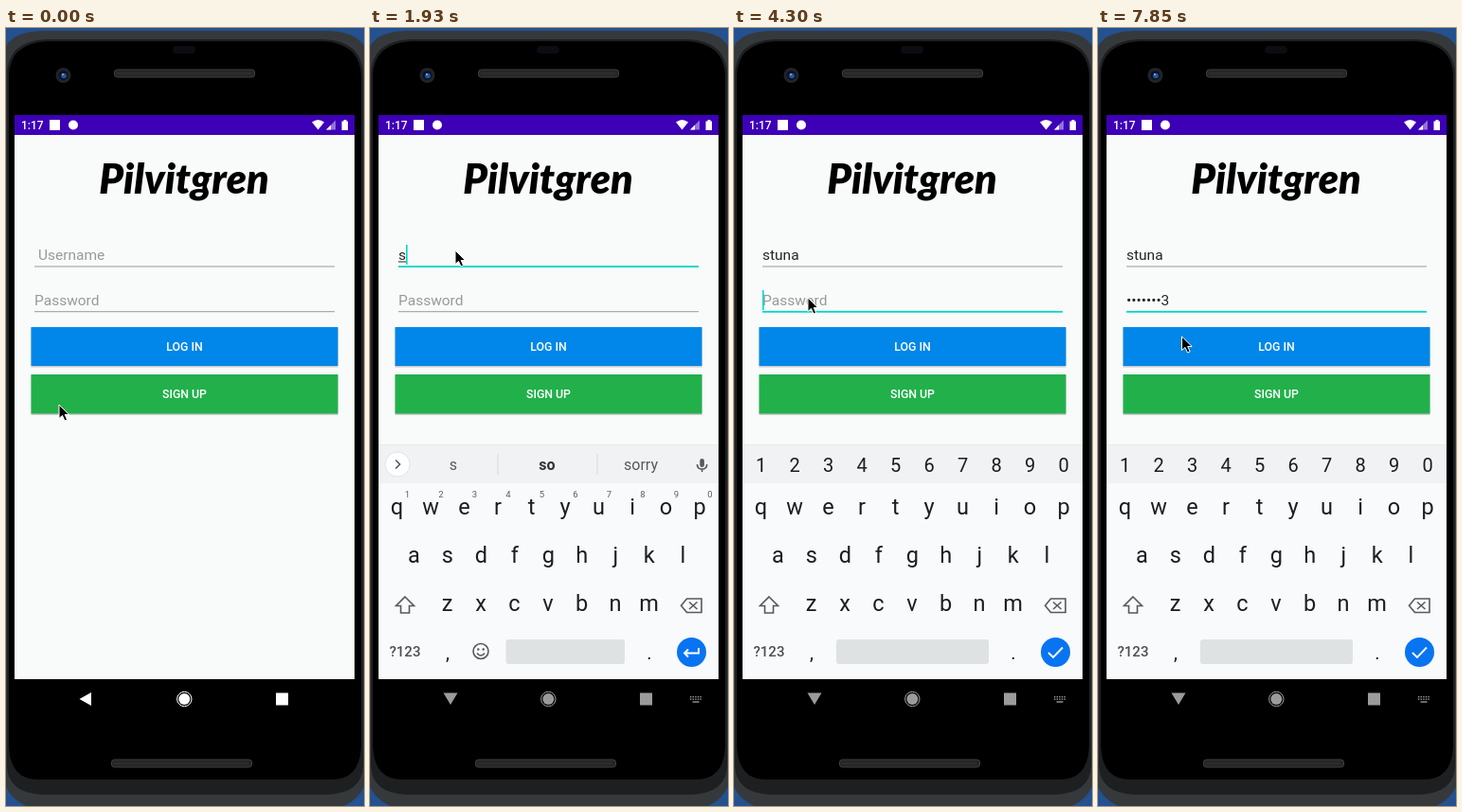
Write an HTML page that moves like this. It is 378 px wide and 822 px high and loops after 8 s.

```html
<!DOCTYPE html>
<html lang="en">
<head>
<meta charset="utf-8">
<title>Login screen</title>
<style>
html, body { margin: 0; width: 100%; height: 100%; overflow: hidden; background: #000; }
svg { display: block; width: 100%; height: 100%; font-family: Roboto, sans-serif; }
.mid { text-anchor: middle; }
.key { font-size: 23.5px; fill: #1c1d1f; }
.num { font-size: 20px; fill: #1c1d1f; }
.tip { font-size: 9.5px; fill: #5c6064; }
.sug { font-size: 16px; fill: #56595d; }
.btn { font-size: 12.3px; font-weight: 500; fill: #fff; }
.field { font-size: 15.5px; fill: #262626; white-space: pre; }
.hint { font-size: 15.5px; fill: #999; }
.line { fill: none; stroke: #56595d; stroke-width: 1.6; }
</style>
</head>
<body>
<svg id="stage" viewBox="0 0 378 822" preserveAspectRatio="none"></svg>
<script>
const LOOP = 8000, STEP = 148.3;
const stage = document.getElementById('stage');

const text = (x, y, s, cls, more = '') => `<text x="${x}" y="${y}" class="${cls}" ${more}>${s}</text>`;
const rect = (x, y, w, h, fill, more = '') =>
  `<rect x="${x}" y="${y}" width="${w}" height="${h}" fill="${fill}" ${more}/>`;
const circle = (x, y, r, fill, more = '') => `<circle cx="${x}" cy="${y}" r="${r}" fill="${fill}" ${more}/>`;
const path = (d, fill, more = '') => `<path d="${d}" fill="${fill}" ${more}/>`;
const line = d => `<path d="${d}" class="line"/>`;
const group = (id, body) => `<g id="${id}">${body}</g>`;
const row = (chars, x, y, cls) =>
  [...chars].map((c, i) => text(x + 35.5 * i, y, c, cls + ' mid')).join('');

function phone() {
  return rect(0, 0, 378, 822, '#24518f') +
    path('M-2 24Q4 4 38 3H340Q374 4 380 24V796Q374 818 346 826H32Q4 818 -2 796Z', '#36393b') +
    path('M1 50Q1 14 42 12H336Q377 14 377 50V780Q376 808 340 810H38Q2 808 1 780Z', '#1d1f20') +
    path('M3 52Q3 16 44 14H334Q375 16 375 52V758Q374 794 344 794H34Q4 794 3 758Z', '#000') +
    rect(176, 19, 24, 8, '#0c0c12', 'rx="4"') +
    circle(60.5, 50, 8, '#20242a') + circle(60.5, 50, 5, '#0b1426') + circle(61, 50.5, 2.8, '#28569f') +
    circle(60, 49, 1, '#8fb4e0') +
    [[114.5, 44], [111.5, 773]].map(([x, y]) =>
      rect(x, y, 148, 8, '#242424', 'rx="3" stroke="#414141"') +
      `<path d="M${x + 3} ${y + 4}h142" stroke="#343434" stroke-width="3" stroke-dasharray="1 1"/>`).join('');
}

function statusBar() {
  return rect(9, 92, 359, 21, '#3d00b7') +
    text(16, 107, '1:17', 'btn', 'style="font-size:12px"') +
    rect(46, 97, 11, 11, '#fff') + circle(71, 102.5, 5, '#fff') +
    path('M323 99.5Q329.500 94.500 336 99.5L329.5 107.5Z', '#fff') +
    path('M338 107.5L348 97.500V107.5Z', '#fff', 'opacity=".45"') + path('M338 107.5L343 102.5V107.5Z', '#fff') +
    path('M354.500 98.500H356.500V97H359.500V98.500H361V108H354.500Z', '#fff');
}

function form() {
  const button = (y, h, fill, label) =>
    rect(26.5, y + 1, 324, h + .5, '#aaa', 'opacity=".6"') + rect(26.5, y, 324, h, fill) +
    text(188.5, y + 25.3, label, 'btn mid');
  return text(188, 175, 'Pilvitgren', 'mid',
      'font-family="Lato, sans-serif" font-size="43" font-weight="900" font-style="italic"') +
    group('userLine', '') + group('passLine', '') +
    text(34, 245, 'Username', 'hint', 'id="userHint"') + text(30, 293, 'Password', 'hint', 'id="passHint"') +
    text(30, 245, '', 'field', 'id="user"') + text(30, 293, '', 'field', 'id="pass"') +
    rect(30, 246.5, 0, 1, '#262626', 'id="compose"') +
    button(316, 41, '#0087e9', 'LOG IN') + button(366, 41.5, '#22b04b', 'SIGN UP');
}

const mic = rect(348.3, 455, 4.6, 9, '#56595d', 'rx="2.3"') + line('M345.500 461Q345.500 466 350.600 466T355.700 461M350.600 466V469');

function toolbar() {
  return circle(29, 462, 13, '#fff', 'stroke="#e2e4e6"') + line('M31 457.500L26.500 462L31 466.500') +
    `<circle cx="76" cy="460.500" r="4.700" class="line"/>` + line('M79.500 464L84.500 469') +
    line('M124 456.500H136V464L132 468.500H124ZM132 468V464H136M127 463Q129.500 466 132 463') +
    circle(127.5, 460, 1, '#56595d') + circle(132.5, 460, 1, '#56595d') +
    text(181, 466.5, 'GIF', 'mid', 'font-size="12.5" font-weight="700" fill="#56595d"') +
    rect(229, 455.5, 13, 13, '#6a6d71') + rect(266.5, 452, 1, 21, '#d5d8da') +
    [294, 299.5, 305].map(x => circle(x, 462, 1.7, '#56595d')).join('') + mic;
}

function suggestions() {
  return circle(29, 461, 13, '#fff', 'stroke="#e2e4e6"') + line('M27 456.500L31.500 461L27 465.500') +
    text(88, 467, '', 'sug mid', 'id="sug0"') +
    text(187, 467, '', 'sug mid', 'id="sug1" style="font-weight:700;fill:#333"') +
    text(286, 467, '', 'sug mid', 'id="sug2"') +
    rect(134.5, 450, 1, 22, '#d5d8da') + rect(239.5, 450, 1, 22, '#d5d8da') + mic;
}

function keyboard() {
  const face = `<circle cx="117" cy="658.500" r="8" class="line"/>` + circle(114.3, 656.5, 1.2, '#56595d') +
    circle(119.7, 656.5, 1.2, '#56595d') + line('M113 660.500Q117 665.500 121 660.500');
  const enter = 'fill="none" stroke="#fff" stroke-width="1.900"';
  return rect(9, 440, 359, 248, '#f8fafb') + rect(9, 440, 359, 41, '#f0f2f4') +
    rect(9, 440, 359, 1, '#e7e9eb') +
    group('tools', toolbar()) + group('sugs', suggestions()) +
    group('digits', row('1234567890', 28.5, 469, 'num')) +
    group('tips', row('1234567890', 39.5, 496, 'tip')) +
    row('qwertyuiop', 28.5, 514, 'key') + row('asdfghjkl', 46.3, 565, 'key') + row('zxcvbnm', 81.5, 616, 'key') +
    line('M37 601L46.500 610.500H41.500V618H32.500V610.500H27.500Z') +
    line('M334.500 603H350V617.500H334.500L328.500 610.200ZM337 606.500L345.500 614M345.500 606.500L337 614') +
    text(37, 664, '?123', 'mid', 'font-size="15" font-weight="500" fill="#4c4f53"') +
    text(82, 667, ',', 'num mid') + text(295, 667, '.', 'num mid') +
    group('emoji', face) + rect(143.5, 646, 125.5, 26, '#dfe2e2', 'rx="3" id="space"') +
    circle(339.5, 659.5, 15.5, '#0874f2') +
    group('enter', path('M347 655V660.500H332M336 656.500L332 660.500L336 664.500', 'none', enter)) +
    group('done', path('M332 660L337 665L347 654.500', 'none', enter));
}

function navBar() {
  const home = fill => circle(188.3, 709, 6, fill) + `<circle cx="188.300" cy="709" r="7.700" fill="none" stroke="${fill}"/>`;
  const dots = [0, 1].map(r => [0, 1, 2, 3, 4].map(c =>
    rect(338 + c * 2.6, 706 + r * 2.5, 1.4, 1.4, '#999')).join('')).join('');
  return group('navIdle', path('M77.500 709L90 702V716Z', '#fff') + home('#fff') + rect(285, 702.5, 13, 13, '#fff')) +
    group('navTyping', path('M77.500 702.500H92.500L85 715Z', '#9b9b9b') + home('#9b9b9b') +
      rect(285, 702.5, 13, 13, '#9b9b9b') + dots + rect(340.5, 711.3, 7, 1.4, '#999'));
}

stage.innerHTML = phone() + rect(9, 92, 359, 596, '#f9fafa') + statusBar() + form() + navBar() +
  '<clipPath id="clip"><rect x="9" y="113" width="359" height="577"/></clipPath>' +
  `<g clip-path="url(#clip)">${group('keys', keyboard())}</g>` +
  rect(30, 229, 1.6, 21, '#03d6c6', 'id="caret"') +
  path('M0 0V14.500L3.500 11.500L6 17L8.600 15.900L6.200 10.500H10.700Z', '#000',
    'id="mouse" stroke="#fff" stroke-width="1"');

const el = {};
stage.querySelectorAll('[id]').forEach(n => el[n.id] = n);
const show = (id, on) => el[id].setAttribute('display', on ? 'inline' : 'none');
const put = (id, s) => { if (el[id].textContent !== s) el[id].textContent = s; };

const NAME = 'stuna', SECRET = NAME + '123';
const nameAt = [1925, 2075, 2375, 2825, 2965];
const secretAt = [5185, 5325, 5625, 6075, 6225, 6665, 6815, 7255];
const FOCUS = 1030, SWITCH = 4150, KEYPAD = 4295;
const words = [['s', 'so', 'sorry'], ['st', 'still', 'stuff'], ['stu', 'stuff', 'study'],
  ['stun', 'stunt', 'stung'], ['stuna', 'Stuna', 'Stulm']];
const moves = [
  [140, 890, 56, 398, 90, 235],
  [3600, 4010, 90, 235, 78, 285],
  [7300, 7850, 78, 285, 88.5, 326]
];
const count = (times, t) => times.filter(at => at <= t).length;

function mouseAt(t) {
  let pos = [56, 398];
  for (const [from, to, x0, y0, x1, y1] of moves) {
    if (t < from) break;
    const p = Math.min(1, (t - from) / (to - from)), e = p * p * (3 - 2 * p);
    pos = [x0 + (x1 - x0) * e, y0 + (y1 - y0) * e];
  }
  return pos;
}

function underline(id, y, on) {
  el[id].innerHTML = on ? rect(30, y - .8, 317, 1.8, '#03d6c6') : rect(30, y - .5, 317, 1, '#999');
}

function draw(t) {
  const tick = Math.floor((t + 12) / STEP) * STEP;
  const typed = count(nameAt, t), hidden = count(secretAt, t);
  const open = t >= FOCUS, onPass = t >= SWITCH, pad = t >= KEYPAD;

  put('user', NAME.slice(0, typed));
  put('pass', hidden ? '•'.repeat(hidden - 1) + SECRET[hidden - 1] : '');
  show('userHint', !typed);
  show('passHint', !hidden);
  underline('userLine', 252, open && !onPass);
  underline('passLine', 299.7, onPass);

  const userEnd = typed ? el.user.getComputedTextLength() : 0;
  const passEnd = hidden ? el.pass.getComputedTextLength() : 0;
  el.compose.setAttribute('width', onPass ? 0 : userEnd);

  const events = [FOCUS - 60, ...nameAt.map(x => x - 50), KEYPAD + 90, ...secretAt.map(x => x - 50)];
  const last = events.filter(at => at <= t).pop() || 0;
  show('caret', open && (t - last) % 1000 < 500);
  el.caret.setAttribute('x', 30 + (onPass ? passEnd : userEnd));
  el.caret.setAttribute('y', onPass ? 277 : 229);

  show('keys', open);
  show('navTyping', open);
  show('navIdle', !open);
  const drop = open ? 45 * Math.exp(-Math.max(0, tick - FOCUS) / 48) : 0;
  el.keys.setAttribute('transform', `translate(0 ${drop < .3 ? 0 : drop})`);
  show('tools', !typed);
  show('sugs', typed && !pad);
  show('digits', pad);
  show('tips', !pad);
  show('emoji', !pad);
  show('enter', !pad);
  show('done', pad);
  el.space.setAttribute('x', pad ? 108 : 143.5);
  el.space.setAttribute('width', pad ? 161 : 125.5);
  if (typed) words[typed - 1].forEach((w, i) => put('sug' + i, w));

  el.mouse.setAttribute('transform', `translate(${mouseAt(tick)})`);
}

const start = performance.now();
function frame() {
  draw((performance.now() - start) % LOOP);
  requestAnimationFrame(frame);
}
frame();
</script>
</body>
</html>
```
